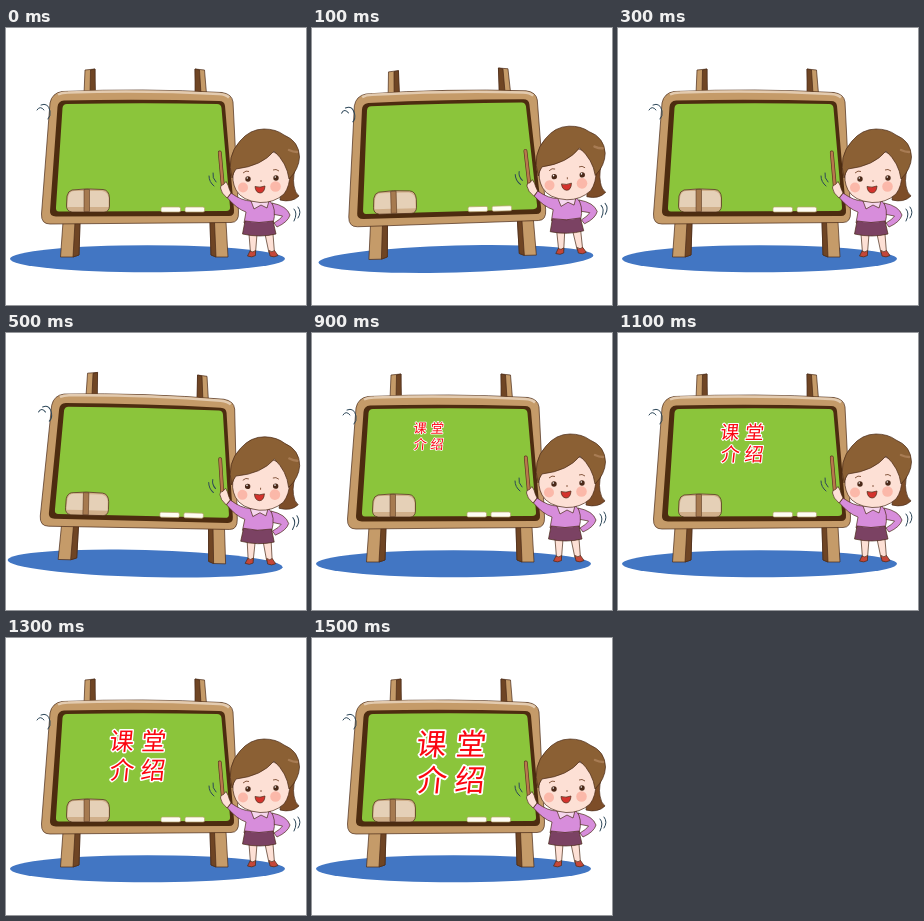
These frames come from a looping animation (300 by 277 pixels, 3.5 s). An HTML page:

```html
<!DOCTYPE html>
<html lang="zh-CN">
<head>
<meta charset="utf-8">
<style>
html, body { margin: 0; width: 100%; height: 100%; overflow: hidden; background: #fff; }
svg { display: block; width: 100vw; height: 100vh; }
.title { font: 500 30px "Noto Sans CJK SC", "Noto Sans CJK", sans-serif; fill: #fb0510; stroke: #fff; stroke-width: 3.6; stroke-linejoin: round; paint-order: stroke; text-anchor: middle; }
.line { fill: none; stroke: #2c4658; stroke-width: 1; stroke-linecap: round; }
.ink { stroke: #4a2a17; stroke-width: .7; stroke-linejoin: round; }
.wood { fill: #c59b69; }
.dark { fill: #6f4524; }
.skin { fill: #fde0d5; }
.hair { fill: #8b6034; }
.top { fill: #d78ddb; }
</style>
</head>
<body>
<svg viewBox="0 0 300 277">
  <g id="scene">
    <ellipse cx="141.5" cy="230.800" rx="137.5" ry="13.500" fill="#4276c3"/>

    <g id="easel" class="ink">
      <path class="wood" d="M79 42L89 41L88 66H78ZM57 194H74L73 227L67 229H54.500Z"/>
      <path class="dark" d="M84.500 42L89 41L89.500 66H84ZM69 194H74L73 227L67 229Z"/>
      <path class="wood" d="M189 41L198.500 42L200.500 66H190ZM204 194H220L222 229H210L205 227Z"/>
      <path class="dark" d="M189 41L193.500 42L195 66H189ZM204 194H208.500L210 229L205 227Z"/>
    </g>

    <g id="board">
      <path class="wood ink" d="M56 63.500Q138 60 216 64.500Q226 66 227 74L232.500 184Q233 194.500 225 194.500L44 196Q35 196 35.500 186L44 75Q46 65 56 63.500Z"/>
      <path d="M52 66.500Q56 64.500 62 64.500Q138 62 213 66Q220 66.500 223 69.500" fill="none" stroke="#e3cbb0" stroke-width="2.500"/>
      <path fill="#4d2c10" d="M58 72.500Q138 71 213 73Q218.500 73 219 78L228 182Q228.500 188 223 188L50 188.500Q43.500 188 44 183L51.500 79Q52 73 58 72.500Z"/>
      <path fill="#8bc53b" d="M61 76Q138 74.500 211 76Q215 76 215.500 80L224 179Q224.500 183 220 183L53 183.500Q49.500 183.500 50 179L56.500 80Q57 76 61 76Z"/>
      <g class="ink">
        <path fill="#d0af8a" d="M66 162Q80 160 97 161.500Q103 162 103.500 170V178Q103 184 98 184H66Q60 183 60.500 177L61 168Q62 163 66 162Z"/>
        <path fill="#e5d0b7" stroke="none" d="M62 170Q63 163 68 163H78V179H61.500ZM83.500 163H96Q102 164 102.500 170V179H83.500Z"/>
        <path fill="#a67a50" stroke-width=".5" d="M78 161.500H83.500V183.500H78Z"/>
      </g>
      <g fill="#fffdf3" stroke="#b7a36d" stroke-width=".7">
        <rect x="155" y="179" width="19.500" height="5" rx="1.500"/>
        <rect x="179" y="179" width="19.500" height="5" rx="1.500"/>
      </g>
      <path class="line" d="M31 82Q34 77 38 82M35 77Q42 74 44 83Q45 88 42 91"/>
    </g>

    <g id="teacher">
      <path fill="#7d4d28" class="ink" d="M277 135L292 132Q286 148 288 158Q289 165 293 168Q286 175 274 172Z"/>
      <path class="skin ink" d="M243 206L244.500 225H249.500L251 206ZM259 206L263 225H268.500L267 206Z"/>
      <path fill="#c44739" class="ink" d="M244 223Q247 225 249.500 222.500V227.500Q246 230 241.500 228ZM263 222.500Q266 225 268.500 222.500L272 227.500Q268 230 264 228Z"/>
      <path class="top ink" d="M266 175Q281 178 284 187Q282 194 271 199L268 195Q275 191 276.500 188L266 186Z"/>
      <path class="top ink" d="M245 173H264Q271 180 267 196Q253 198 238 195L240 184Q231 181 221.500 170L225 165Q236 173 245 173Z"/>
      <path fill="#7b4263" class="ink" d="M239 193Q253 196 267 193L270 206Q254 210 236.500 206Z"/>
      <path fill="#f6d6ee" class="ink" d="M245 173L263 173L261 180L255 177L248 181Z"/>
      <path class="skin ink" d="M228 143Q229 124 255 122Q281 123 284 145Q284 158 278 166Q268 175 254 174.500Q236 173 230 162Q225 152 228 143Z"/>
      <path class="hair ink" d="M226 150Q220 128 234 113Q244 101 258 101Q270 101 278 107Q293 113 293.500 129Q293 141 283 151Q281 135 268 123Q256 138 230 141Q227 145 226 150Z"/>
      <path d="M283 122Q287 124 291 124" fill="none" stroke="#a87c54" stroke-width="2.500" stroke-linecap="round"/>
      <g fill="#fbb8a9"><circle cx="237" cy="159.500" r="5"/><circle cx="269.500" cy="158.500" r="5.300"/></g>
      <g fill="#4a2919"><circle cx="242" cy="151" r="2.700"/><circle cx="270" cy="150" r="2.700"/></g>
      <g fill="#fff"><circle cx="241.300" cy="150" r=".8"/><circle cx="269.300" cy="149" r=".8"/></g>
      <path d="M237 145Q240 142 243 143.500M267 142Q270 140.500 273 143M255 152V154" fill="none" stroke="#7b4b32" stroke-width=".9"/>
      <path fill="#d4332d" class="ink" d="M249 158.500Q254 160 259 158Q258.500 165 254 165Q249.500 164.500 249 158.500Z"/>
      <path d="M213.800 124.500L217 160" stroke="#5c3521" stroke-width="3.800" stroke-linecap="round"/>
      <path d="M213.800 124.500L217 160" stroke="#b8784d" stroke-width="2.500" stroke-linecap="round"/>
      <path class="skin ink" d="M214.500 160Q214 157 217.500 156.500L220 153.500L222 157Q223 161 225 165L221 170Q215 165 214.500 160Z"/>
      <path class="line" d="M203 148Q203 154 208 158M207 145Q206 150 210 154M288 181Q292 185 288 193M292 179Q296 184 292 190"/>
    </g>
  </g>
  <g id="title" class="title"></g>
</svg>
<script>
const LOOP = 3500;
const TILT = 1.5;
const scene = document.getElementById("scene");
const title = document.getElementById("title");

[["课", 19.5, 20], ["堂", 59, 20], ["介", 20, 56], ["绍", 58, 56]].forEach(([char, x, y]) => {
  const node = document.createElementNS("http://www.w3.org/2000/svg", "text");
  node.setAttribute("transform", `translate(${x} ${y + 11.4}) skewX(-6)`);
  node.textContent = char;
  title.append(node);
});

// The picture rocks left, then right, resting upright between.
function tiltAt(t) {
  if (t >= 100 && t < 300) return -TILT;
  if (t >= 500 && t < 700) return TILT;
  return 0;
}

// The heading grows from its top left corner in four hard steps.
function titleWidth(t) {
  if (t < 900) return 0;
  return 33 + 14 * Math.min(3, Math.floor((t - 900) / 200));
}

function draw(t) {
  const width = titleWidth(t);
  scene.setAttribute("transform", `rotate(${tiltAt(t)} 150 138.5)`);
  title.setAttribute("visibility", width ? "visible" : "hidden");
  title.setAttribute("transform", `translate(99 86) scale(${width / 75})`);
}

const start = performance.now();
function tick(now) {
  draw(Math.max(0, now - start) % LOOP);
  requestAnimationFrame(tick);
}
draw(0);
requestAnimationFrame(tick);
</script>
</body>
</html>
```
